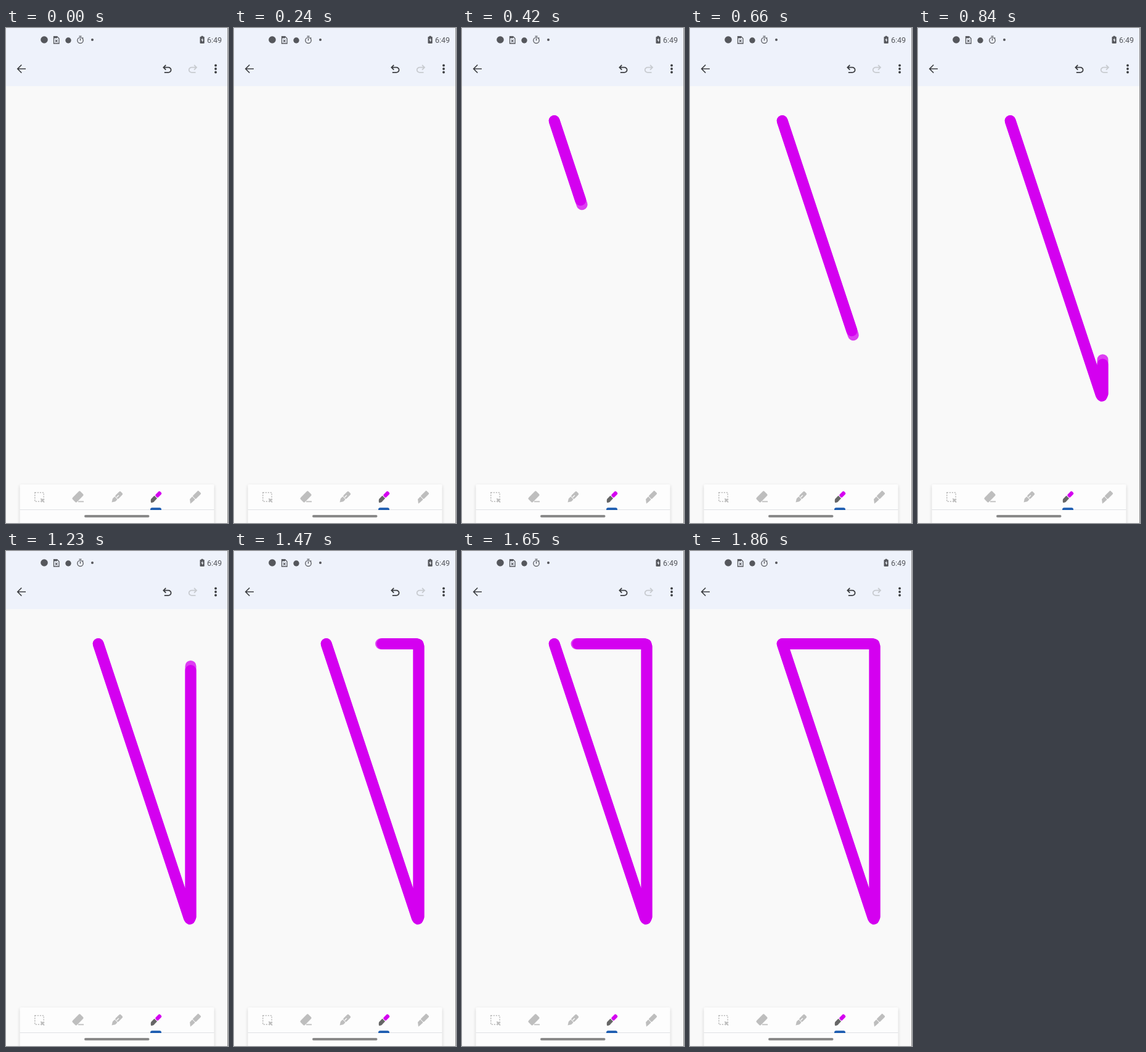
An HTML page with a canvas for the animation above (1890 ms loop, 360x800 px).

```html
<!DOCTYPE html>
<html lang="en">
<head>
<meta charset="utf-8">
<title>Drawing a triangle</title>
<style>
  html, body { margin: 0; width: 100%; height: 100%; overflow: hidden; background: #f9f9f9; }
  canvas { position: absolute; left: 0; top: 0; }
  #clock { position: absolute; left: 326px; top: 12px; font: 12.5px/15px Roboto, sans-serif; color: #55575c; }
</style>
</head>
<body>
<canvas id="stage" width="360" height="800"></canvas>
<span id="clock">6:49</span>
<script>
const LOOP = 1890, STEP = 30;
const PAPER = '#f9f9f9', BAR = '#eef2fb', PANEL = '#fdfdfd';
const STATUS = '#55575c', DARK = '#3c3e42', INK = '#d400f0', MUTED = '#bebebe';
const ctx = document.getElementById('stage').getContext('2d');

function box(x, y, w, h, color, r = 0) {
  ctx.fillStyle = color;
  ctx.beginPath();
  ctx.roundRect(x, y, w, h, r);
  ctx.fill();
}

function dot(x, y, r, color) {
  ctx.fillStyle = color;
  ctx.beginPath();
  ctx.arc(x, y, r, 0, Math.PI * 2);
  ctx.fill();
}

// Draws with the origin moved to (x, y), then scaled and turned.
function at(x, y, draw, sx = 1, sy = 1, turn = 0) {
  ctx.save();
  ctx.translate(x, y);
  ctx.scale(sx, sy);
  ctx.rotate(turn);
  draw();
  ctx.restore();
}

function tilted(x, y, draw) {
  at(x, y, draw, 1, 1, -Math.PI / 4);
}

function line(d, color, width) {
  ctx.strokeStyle = color;
  ctx.lineWidth = width;
  ctx.stroke(new Path2D(d));
}

function shape(d, color) {
  ctx.fillStyle = color;
  ctx.fill(new Path2D(d));
}

function statusBar() {
  dot(62, 19, 5.8, STATUS);
  line('M77.5 14h5.5l3 3v8h-8.5z', STATUS, 1.3);
  box(77, 13.5, 6, 3, STATUS);
  line('M79.9 19l3.6 3.8M83.5 19l-3.6 3.8', STATUS, 1.1);
  dot(101, 20, 4.7, STATUS);
  ctx.strokeStyle = STATUS;
  ctx.lineWidth = 1.3;
  ctx.beginPath();
  ctx.arc(120.5, 20, 4.7, 0, Math.PI * 2);
  ctx.stroke();
  line('M118.5 13.3h4M120.5 17v3.5M124 15.5l1.2 1.2', STATUS, 1.3);
  dot(140, 19, 2, STATUS);
  box(314.5, 14, 7.2, 11, STATUS, 1);
  box(316.6, 12.8, 3, 2, STATUS);
  shape('M318.7 15.7l-2.2 4.2h1.5v3.1l2.2-4.2h-1.5z', BAR);
}

function undoArrow(color) {
  shape('M7 19v-2h7.1q1.575 0 2.738-1T18 13.5t-1.162-2.5T14.1 10H7.8l2.6 2.6L9 14 4 9l5-5 1.4 1.4L7.8 8h6.3q2.425 0 4.163 1.575T20 13.5t-1.738 3.925T14.1 19z', color);
}

function appBar() {
  line('M32 66H19.5M25.3 59.5L18.8 66l6.5 6.5', DARK, 1.7);
  at(250.5, 55.6, () => undoArrow(DARK), 0.9, 0.9);
  at(313.8, 55.6, () => undoArrow('#c8cbd0'), -0.9, 0.9);
  for (const y of [60.5, 66, 71.5]) dot(340, y, 1.9, DARK);
}

function selectTool() {
  ctx.setLineDash([2.2, 1.8]);
  line('M46.8 750.8h14.4v14.4h-14.4z', MUTED, 1.6);
  ctx.setLineDash([]);
  shape('M56 760l7 2.2-2.8 1.2 2.5 2.5-1.3 1.3-2.5-2.5-1.2 2.6z', MUTED);
}

function eraserTool() {
  tilted(116.5, 757.5, () => box(-9, -5, 18, 10, MUTED, 2));
  box(117, 764.5, 9, 1.8, MUTED);
}

function penTool() {
  tilted(180, 758, () => {
    box(-1.5, -3.6, 12, 7.2, MUTED, 2);
    shape('M-12 0l5-3.2h4.7v6.4H-7z', MUTED);
    line('M-1 0h5', PANEL, 1.3);
  });
}

function brushTool() {
  tilted(243, 758, () => {
    box(0.8, -3.1, 10.4, 6.2, INK, 2);
    shape('M-12 1q3-5 6-4.3h5.8v6.4H-6q-3 .8-6-2.1z', '#666');
  });
}

function markerTool() {
  tilted(306, 758, () => {
    box(-1.5, -3.6, 13, 7.2, MUTED, 1.5);
    shape('M-12.5 2.6l4.5-5.8h5.7v6.4h-5.5z', MUTED);
  });
}

function toolbar() {
  ctx.save();
  ctx.shadowColor = 'rgba(0, 0, 0, 0.16)';
  ctx.shadowBlur = 5;
  ctx.shadowOffsetY = 2;
  box(22.5, 737.5, 315, 70, PANEL, 2);
  ctx.restore();
  box(22.5, 778, 315, 1, '#dfe1e4');
  selectTool();
  eraserTool();
  penTool();
  brushTool();
  markerTool();
  box(234, 775.3, 18, 3.7, '#1c5cb0', [3, 3, 0, 0]);
  box(127, 787, 105.5, 4, '#8a8a8a', 2);
}

// Pen path as [time, x, y].
const route = [
  [266, 149.6, 150], [769, 296.6, 592],
  [774, 298, 594.6], [779, 299.5, 591],
  [1265, 299.5, 154.5], [1270, 298.5, 151], [1275, 295, 150],
  [1773, 149.6, 150]
];

function stroke(t, alpha) {
  if (t < route[0][0]) return;
  ctx.save();
  ctx.globalAlpha = alpha;
  ctx.strokeStyle = INK;
  ctx.lineWidth = 18;
  ctx.lineCap = ctx.lineJoin = 'round';
  ctx.beginPath();
  ctx.moveTo(route[0][1], route[0][2]);
  for (let i = 1; i < route.length; i++) {
    const [t0, x0, y0] = route[i - 1], [t1, x1, y1] = route[i];
    const k = Math.min(1, (t - t0) / (t1 - t0));
    ctx.lineTo(x0 + (x1 - x0) * k, y0 + (y1 - y0) * k);
    if (k < 1) break;
  }
  ctx.stroke();
  ctx.restore();
}

function render(t) {
  box(0, 0, 360, 800, PAPER);
  box(0, 0, 360, 94, BAR);
  statusBar();
  appBar();
  // The newest bit of ink is still translucent.
  stroke(t, 0.75);
  stroke(t - 8, 1);
  toolbar();
  box(359, 0, 1, 800, '#8c8c8c');
}

const start = performance.now();
function tick() {
  const t = (performance.now() - start) % LOOP;
  render(Math.floor(t / STEP) * STEP);
  requestAnimationFrame(tick);
}
tick();
</script>
</body>
</html>
```
